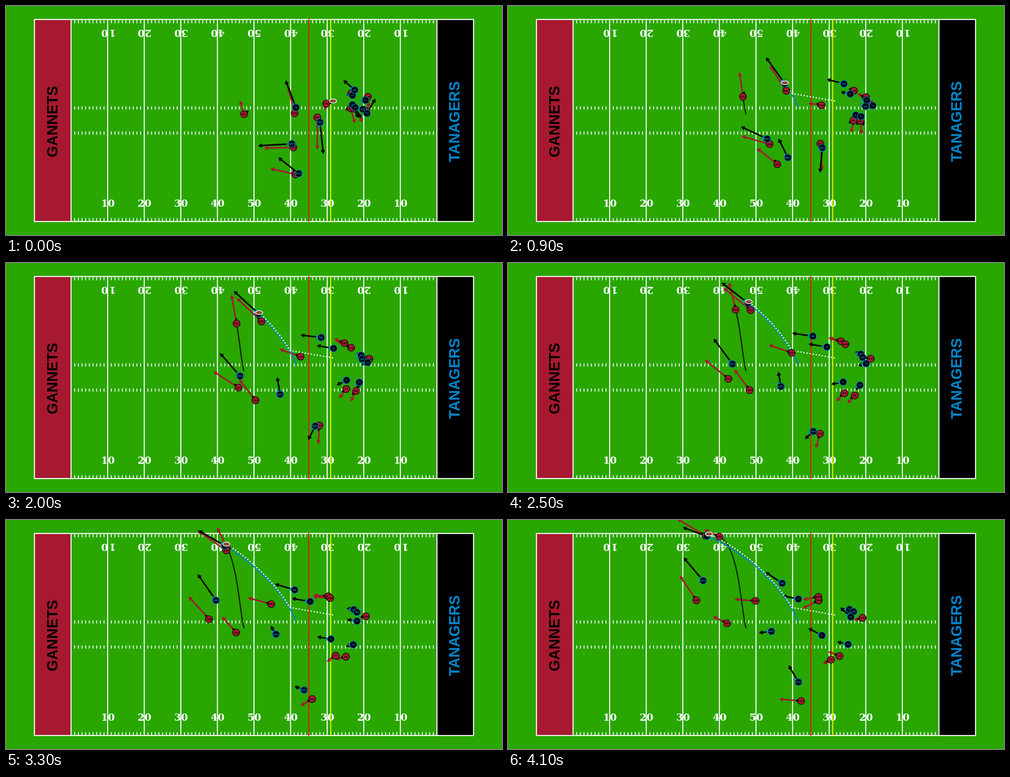
Write an HTML page that moves like this. It is 1098x510 px and loops after 4.2 s.

```html
<!DOCTYPE html>
<html lang="en">
<head>
<meta charset="utf-8">
<title>Passing play</title>
<style>
html, body { margin: 0; width: 100%; height: 100%; overflow: hidden; background: #29a600; }
svg { display: block; width: 100%; height: 100%; }
text { text-anchor: middle; font-family: "Liberation Sans", Arial, sans-serif; font-weight: 700; }
.team { font-size: 32.5px; }
.yard { font: 900 22px "DejaVu Serif", "Noto Serif", serif; fill: #fff; }
.tag { font-size: 6px; }
.line { stroke: #fff; stroke-width: 2.3; fill: none; }
.ticks { stroke: #fff; stroke-width: 6.8; stroke-dasharray: 1.9 6.2; }
.trail { fill: none; stroke-width: 2.6; }
</style>
</head>
<body>
<svg id="stage" viewBox="0 0 1098 510">
  <rect width="1098" height="510" fill="#29a600"/>
  <rect x="63" y="30" width="81" height="450" fill="#a71930"/>
  <rect x="954" y="30" width="81" height="450" fill="#000"/>
  <g id="field"></g>
  <rect class="line" x="63" y="30" width="972" height="450"/>
  <path stroke="#f00" stroke-width="2" d="M670.3 29V481"/>
  <path stroke="#ff0" stroke-width="2" d="M718.8 29V481"/>
  <text class="team" transform="translate(113.8 257.5) rotate(-90)">GANNETS</text>
  <text class="team" transform="translate(1003.8 257.5) rotate(-90)" fill="#0085ca">TANAGERS</text>
  <g id="arrows"></g>
  <path id="safetyTrail" class="trail" stroke="#000" stroke-opacity=".8"/>
  <path id="endTrail" class="trail" stroke="#0085ca"/>
  <path id="ballTrail" class="trail" stroke="#fff" stroke-dasharray="2.8 4"/>
  <g id="wedges"></g>
  <g id="players"></g>
  <ellipse id="ball" rx="8" ry="4.4" fill="#8c5035" stroke="#fff" stroke-width="1.5"/>
</svg>
<script>
const LOOP = 4200, STEP = 100;
const KEYS = [0, 1.3, 2.5, 4.1];
const CATCH = 0.5;
const RED = '#a71930', BLUE = '#0085ca', BLACK = '#000';
const $ = id => document.getElementById(id);

function add(parent, tag, attrs, text) {
  const el = document.createElementNS('http://www.w3.org/2000/svg', tag);
  for (const k in attrs) el.setAttribute(k, attrs[k]);
  if (text) el.textContent = text;
  return parent.appendChild(el);
}

function drawField() {
  const field = $('field');
  for (const y of [35, 227, 283, 476]) add(field, 'path', { class: 'ticks', d: `M151.2 ${y}H953` });
  for (let i = 0; i <= 10; i++) {
    const x = 144 + 81 * i, n = 10 * Math.min(i, 10 - i);
    add(field, 'path', { class: 'line', d: `M${x} 30V480` });
    if (!n) continue;
    add(field, 'text', { class: 'yard', x: x + 0.5, y: 447 }, n);
    add(field, 'text', {
      class: 'yard', 'letter-spacing': n === 10 ? 2.5 : 0,
      transform: `translate(${x + 1} 52.5) rotate(180)`
    }, n);
  }
}

// Cubic through four values at KEYS (divided differences); yields [value, speed]
function cubic(values) {
  const c = [...values];
  for (let k = 1; k < 4; k++)
    for (let i = 3; i >= k; i--) c[i] = (c[i] - c[i - 1]) / (KEYS[i] - KEYS[i - k]);
  return t => {
    let p = c[3], v = 0;
    for (let i = 2; i >= 0; i--) {
      v = v * (t - KEYS[i]) + p;
      p = p * (t - KEYS[i]) + c[i];
    }
    return [p, v];
  };
}

const players = {};

function player(name, home, xs, ys) {
  const main = home ? BLACK : RED, accent = home ? BLUE : BLACK;
  const fx = cubic(xs), fy = cubic(ys);
  const arrow = add($('arrows'), 'g', { fill: main, stroke: main });
  const body = add($('players'), 'g');
  add(body, 'circle', { r: 7.9, fill: main, stroke: accent, 'stroke-width': 1.3 });
  add(body, 'text', { class: 'tag', y: 2.1, fill: accent }, name);
  players[name] = {
    home, arrow, body,
    at(t) {
      const [x, vx] = fx(t), [y, vy] = fy(t);
      return { x, y, vx, vy };
    },
    shaft: add(arrow, 'path', { 'stroke-width': 3.4 }),
    head: add(arrow, 'path', { d: 'M0 0L-7.5 -4.3V4.3Z', 'stroke-width': 0.8 }),
    wedge: add($('wedges'), 'path', { d: 'M13 0L4 -6V6Z', fill: accent })
  };
}

const defend = (name, xs, ys) => player(name, false, xs, ys);
const attack = (name, xs, ys) => player(name, true, xs, ys);

defend('SS1', [527, 517, 504, 468], [241, 179, 104, 37]);
defend('SS2', [639, 600, 537, 437], [239, 167, 105, 35]);
defend('CB1', [689, 693, 691, 649], [248, 329, 380, 403]);
defend('CB2', [636, 555, 488, 417], [315, 299, 258, 179]);
defend('CB3', [641, 579, 535, 485], [375, 337, 283, 230]);
defend('ILB1', [765, 762, 737, 687], [194, 185, 174, 171]);
defend('ILB2', [709, 681, 628, 548], [217, 218, 200, 180]);
defend('OLB1', [797, 804, 803, 785], [234, 217, 213, 218]);
defend('OLB2', [801, 784, 747, 688], [202, 199, 181, 179]);
defend('DT', [763, 762, 745, 715], [228, 265, 290, 311]);
defend('DE', [770, 780, 768, 734], [228, 267, 295, 303]);

attack('C', [767, 766, 742, 695], [220, 251, 265, 257]);
attack('G', [767, 748, 706, 643], [199, 194, 187, 176]);
attack('T1', [796, 792, 781, 756], [210, 209, 203, 199]);
attack('QB', [790, 791, 785, 765], [230, 220, 210, 204]);
attack('T2', [773, 783, 779, 753], [226, 254, 272, 277]);
attack('T3', [799, 807, 793, 759], [239, 220, 224, 216]);
attack('RB', [772, 728, 675, 607], [187, 170, 163, 141]);
attack('WR1', [648, 613, 604, 583], [373, 321, 275, 248]);
attack('WR2', [695, 693, 676, 643], [259, 336, 375, 361]);
attack('WR3', [633, 552, 497, 432], [307, 283, 225, 135]);
attack('TE', [642, 595, 531, 440], [226, 150, 89, 36]);

function carried(t) {
  const { x, y } = players.TE.at(t);
  return { x: x + 0.3 * t * t, y: y - 1.5 - 0.2 * t * t };
}

// Straight throw up to the catch, then in the receiver's hands
function ballAt(t) {
  if (t >= CATCH) return carried(t);
  const end = carried(CATCH), u = t / CATCH;
  return { x: 724 + (end.x - 724) * u, y: 211.5 + (end.y - 211.5) * u };
}

const degrees = (y, x) => Math.atan2(y, x) * 180 / Math.PI;
const place = (el, x, y, a = 0) => el.setAttribute('transform', `translate(${x} ${y}) rotate(${a})`);

// Attackers lean upfield; defenders watch the ball, less and less as they run
function facing(home, { x, y, vx, vy }, ball, t) {
  if (home) return degrees(vy, vx - 20);
  const dx = ball.x - x, dy = ball.y - y;
  const look = 60 * Math.exp(-t) / (Math.hypot(dx, dy) + 1);
  return degrees(vy + look * dy, vx + look * dx);
}

function trail(id, at, step) {
  let d = '';
  for (let i = 0; i <= step; i++) {
    const { x, y } = at(i * STEP / 1000);
    d += (i ? 'L' : 'M') + x.toFixed(2) + ' ' + y.toFixed(2);
  }
  $(id).setAttribute('d', d);
}

function render(step) {
  const t = step * STEP / 1000, ball = ballAt(t);
  for (const p of Object.values(players)) {
    const now = p.at(t), speed = Math.hypot(now.vx, now.vy);
    place(p.body, now.x, now.y);
    place(p.wedge, now.x, now.y, facing(p.home, now, ball, t));
    place(p.arrow, now.x, now.y, degrees(now.vy, now.vx));
    p.shaft.setAttribute('d', `M0 0H${Math.max(0, speed - 5)}`);
    place(p.head, speed, 0);
  }
  trail('safetyTrail', players.SS1.at, step);
  trail('endTrail', players.TE.at, step);
  trail('ballTrail', ballAt, step);
  place($('ball'), ball.x, ball.y);
}

let last = -1;
function tick(now) {
  const step = Math.floor(now % LOOP / STEP);
  if (step !== last) render(last = step);
  requestAnimationFrame(tick);
}

drawField();
render(0);
requestAnimationFrame(tick);
</script>
</body>
</html>
```
